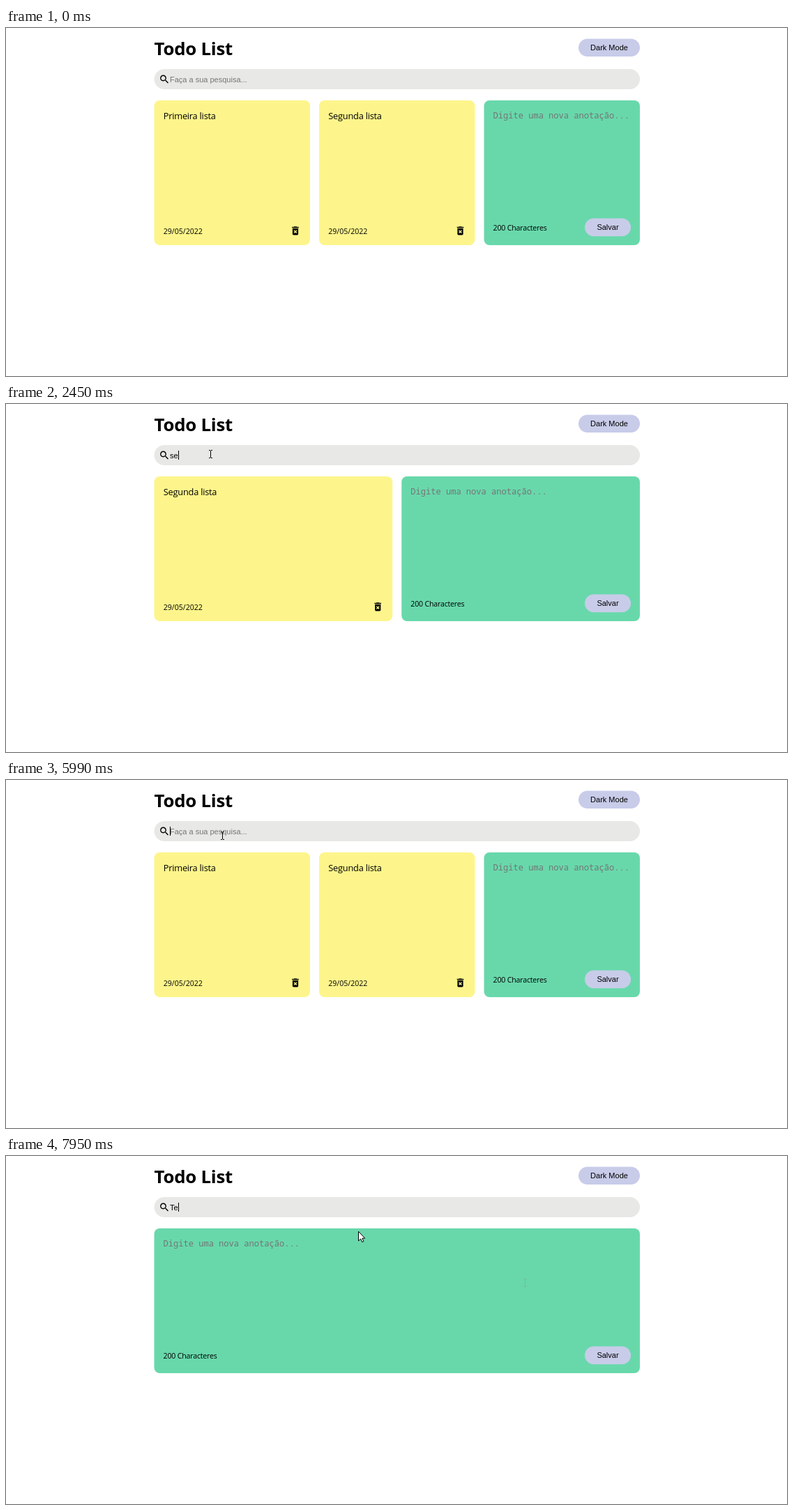
Write an HTML page that moves like this. It is 1120x500 px and loops after 8 s.

```html
<!DOCTYPE html>
<html lang="pt-BR">
<head>
<meta charset="utf-8">
<title>Todo List</title>
<style>
  html, body { margin: 0; width: 100%; height: 100%; overflow: hidden; background: #fff; }
  svg { display: block; width: 1120px; height: 500px; }
  text { white-space: pre; }
  .title { font: 700 25.8px "Open Sans", "Noto Sans", sans-serif; letter-spacing: -.25px; }
  .note { font: 12.8px "Open Sans", "Noto Sans", sans-serif; letter-spacing: -.22px; }
  .small { font: 10.6px "Open Sans", "Noto Sans", sans-serif; }
  .count { letter-spacing: -.18px; }
  .ui { font: 11px "Liberation Sans", Arial, sans-serif; }
  .mono { font: 12.07px "Noto Sans Mono", "DejaVu Sans Mono", monospace; }
  .hint { fill: #757575; }
  .btn { fill: #c8cce9; }
  .yellow { fill: #fdf58b; }
  .green { fill: #68d8ab; }
  .off { display: none; }
</style>
</head>
<body>
<svg viewBox="0 0 1120 500">
  <defs>
    <path id="trash" transform="scale(.683)" d="M6 19c0 1.1.9 2 2 2h8c1.1 0 2-.9 2-2V7H6v12zm2.46-7.12l1.41-1.41L12 12.59l2.12-2.12 1.41 1.41L13.41 14l2.12 2.12-1.41 1.41L12 15.41l-2.12 2.12-1.41-1.41L10.59 14l-2.13-2.12zM15.5 4l-1-1h-5l-1 1H5v2h14V4z"/>
    <path id="lens" transform="scale(.683)" d="M15.5 14h-.79l-.28-.27C15.41 12.59 16 11.11 16 9.5 16 5.91 13.09 3 9.5 3S3 5.91 3 9.5 5.91 16 9.5 16c1.61 0 3.09-.59 4.23-1.57l.27.28v.79l5 4.99L20.49 19l-4.99-5zm-6 0C7.01 14 5 11.99 5 9.5S7.01 5 9.5 5 14 7.01 14 9.5 11.99 14 9.5 14z"/>
    <path id="arrowShape" d="M.5.5v13.5l3.2-3 2 4.6 2.2-.9-2-4.5h3.8z"/>
    <path id="beamShape" d="M-2 -5.5h2M1 -5.5h2M.5-5v10M-2 5.5h2M1 5.5h2" fill="none"/>
  </defs>
  <text class="title" x="212.6" y="39.3">Todo List</text>
  <rect class="btn" x="821" y="15.5" width="88" height="25.6" rx="12.8"/>
  <text class="ui" x="865" y="32" text-anchor="middle">Dark Mode</text>
  <rect x="212.5" y="59" width="696.5" height="29" rx="14.5" fill="#e8e9e7"/>
  <use href="#lens" transform="translate(219 65.5)"/>
  <text class="ui" id="query" x="235" y="77.5"></text>
  <rect id="caret" y="67" width="1" height="13"/>
  <g id="board"></g>
  <use href="#arrowShape" id="arrowTrail" transform="translate(486 146)" fill="#f3f1f0"/>
  <use href="#beamShape" id="beamTrail" transform="translate(744 182)" stroke="#7d9c98" opacity=".5"/>
  <use href="#arrowShape" id="arrow" fill="#fff" stroke="#000"/>
  <use href="#beamShape" id="beam" stroke="#000"/>
</svg>
<script>
const LOOP = 8000, LEFT = 212.5, WIDTH = 696.5, GAP = 13;
const FOCUS = 1790, BLINK = 527, HINT = 'Faça a sua pesquisa...';
const NOTES = ['Primeira lista', 'Segunda lista'];
const $ = id => document.getElementById(id);
const show = (el, on) => el.classList.toggle('off', !on);

const panel = (x, w, color) =>
  `<rect class="${color}" x="${x}" y="104" width="${w}" height="208" rx="8"/>`;

const noteCard = (x, w, name) => panel(x, w, 'yellow') + `
  <text class="note" x="${x + 13.2}" y="131">${name}</text>
  <text class="small" x="${x + 13.2}" y="296">29/05/2022</text>
  <use href="#trash" transform="translate(${x + w - 29.2} 283.1)"/>`;

const newCard = (x, w) => panel(x, w, 'green') + `
  <text class="mono hint" x="${x + 13}" y="129.5">Digite uma nova anotação...</text>
  <text class="small count" x="${x + 13}" y="291">200 Characteres</text>
  <rect class="btn" x="830" y="273.6" width="66" height="25.6" rx="12.8"/>
  <text class="ui" x="863" y="290" text-anchor="middle">Salvar</text>`;

function board(names) {
  const n = names.length + 1, w = (WIDTH - GAP * (n - 1)) / n;
  const at = i => LEFT + i * (w + GAP);
  return names.map((name, i) => noteCard(at(i), w, name)).join('') + newCard(at(n - 1), w);
}

// Key presses; '<' is backspace
const keys = [[2120, 's'], [2450, 'e'], [3670, 'g'], [3810, 'u'],
  [4270, '<'], [4470, '<'], [4610, '<'], [5260, '<'], [7280, 'T'], [7950, 'e']];

// Typing a letter restarts the caret blink, deleting does not
function input(t) {
  let text = '', since = FOCUS;
  for (const [time, key] of keys) {
    if (time > t) break;
    if (key === '<') text = text.slice(0, -1);
    else { text += key; since = time; }
  }
  return { text, caret: t >= FOCUS && Math.floor((t - since) / BLINK) % 2 === 0 };
}

// Pointer moves: start, end, number of steps, points passed
const moves = [
  [310, 1080, 11, [[915, 449], [600, 250], [292, 54]]],
  [1130, 1340, 3, [[284, 56], [291, 66]]],
  [1520, FOCUS, 4, [[290, 64], [293, 72]]],
  [5920, 6560, 10, [[310, 80], [744, 182], [620, 243], [497, 208], [486, 146], [505, 108]]]
];

function pointer(t) {
  const move = moves.filter(m => m[0] <= t).pop();
  if (!move) return null;
  const [start, end, steps, pts] = move, last = steps - 1;
  const u = Math.min(1, Math.floor((t - start) / (end - start) * last) / last);
  const p = u * (pts.length - 1), k = Math.min(Math.floor(p), pts.length - 2);
  return pts[k].map((a, j) => Math.round(a + (pts[k + 1][j] - a) * (p - k)));
}

const overField = (x, y, t) =>
  (t >= FOCUS && y > 59 && y < 88) || (x > 698 && x < 896 && y > 117 && y < 260);

let shown;
function draw(t) {
  const { text, caret } = input(t), query = $('query');
  if (text !== shown) {
    shown = text;
    query.textContent = text || HINT;
    query.classList.toggle('hint', !text);
    $('board').innerHTML = board(NOTES.filter(name => name.toLowerCase().includes(text)));
  }
  const len = text ? query.getComputedTextLength() : 0;
  $('caret').setAttribute('x', Math.round(234.9 + len));
  show($('caret'), caret);

  const pos = pointer(t), beam = pos && overField(...pos, t);
  show($('arrow'), pos && !beam);
  show($('beam'), beam);
  if (pos) $(beam ? 'beam' : 'arrow').setAttribute('transform', `translate(${pos})`);
  show($('beamTrail'), t >= 6140);
  show($('arrowTrail'), t >= 6560 && !text);
}

const start = performance.now();
function tick() {
  draw((performance.now() - start) % LOOP);
  requestAnimationFrame(tick);
}
tick();
</script>
</body>
</html>
```
